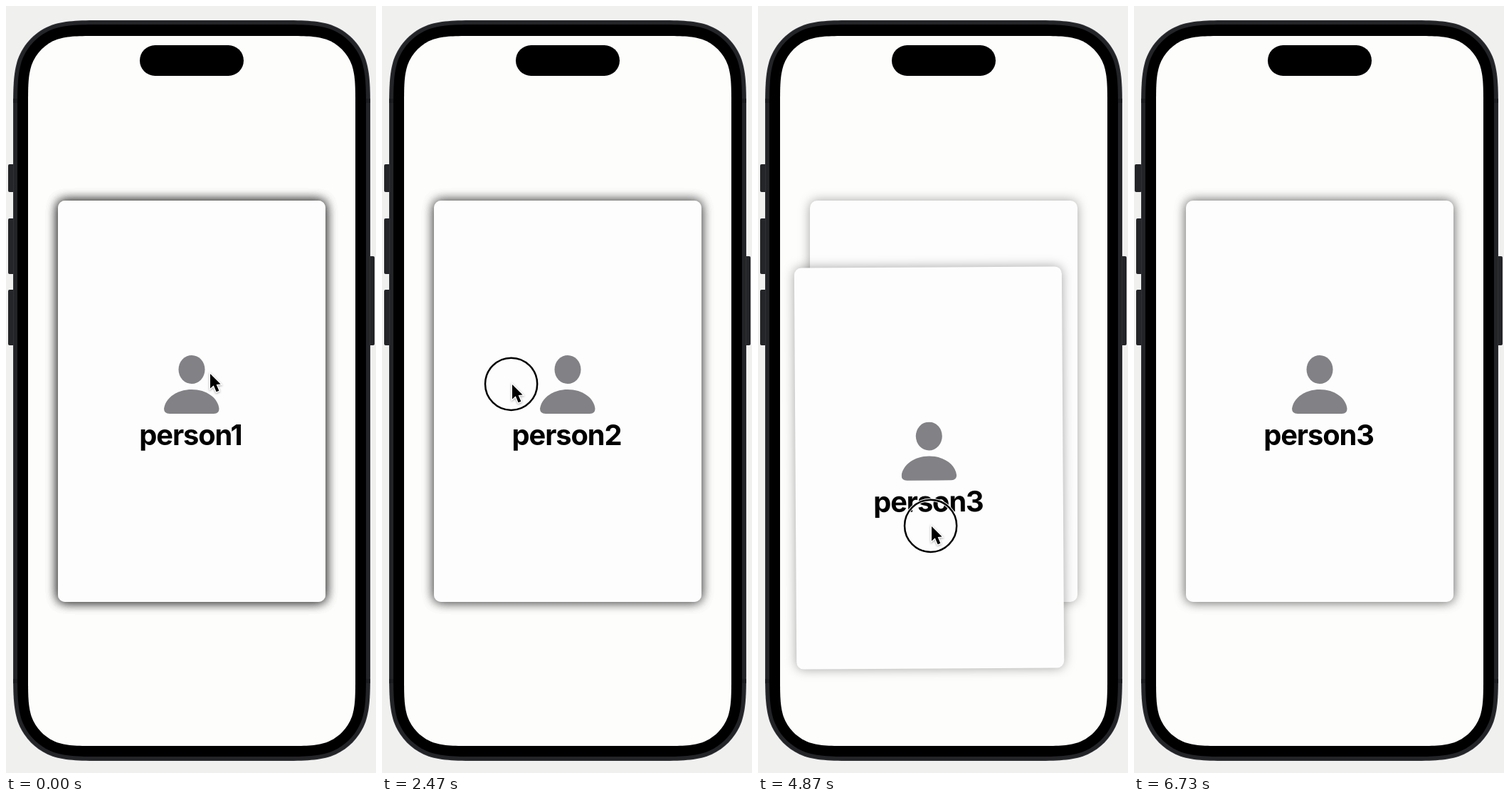
Recreate the animation shown at these times as an HTML page. Size 520 by 1076 pixels, loop 6.76 s.

```html
<!DOCTYPE html>
<html lang="en">
<head>
<meta charset="utf-8">
<title>Swipe cards</title>
<style>
  html, body { margin: 0; width: 100%; height: 100%; overflow: hidden; background: #f0f0ef; }
  #stage { position: relative; width: 520px; height: 1076px; overflow: hidden; }
  #stage div, #stage svg { position: absolute; box-sizing: border-box; }
  .side { width: 10px; background: #232528; border-radius: 2px; }
  .shell { left: 10px; top: 20px; width: 502px; height: 1039px; background: #303136; }
  .rim { left: 11px; top: 21px; width: 500px; height: 1037px; background: #232427; }
  .bezel { left: 16px; top: 26px; width: 490px; height: 1027px; background: #000; }
  .band { width: 6px; height: 6px; background: #1c1d20; }
  .screen { left: 31px; top: 42px; width: 460px; height: 996px; background: #fdfdfc; overflow: hidden; }
  .island { left: 188px; top: 55px; width: 146px; height: 43px; border-radius: 22px; background: #000; }
  .card { left: 42px; top: 231px; width: 376px; height: 563px; border-radius: 10px;
          box-shadow: 0 0 16px rgba(0, 0, 0, .36); }
  .card svg { left: 149px; top: 217px; }
  .name { left: -1.5px; top: 305.2px; width: 376px; height: 48px; text-align: center;
          font: 700 39.8px/48px Inter, "Liberation Sans", sans-serif; font-optical-sizing: none;
          letter-spacing: -1.1px; color: #000; white-space: nowrap; }
  #pointer { left: 0; top: 0; overflow: visible; }
  #arrow { filter: drop-shadow(0 1.5px 1.5px rgba(0, 0, 0, .35)); }
</style>
</head>
<body>
<div id="stage">
  <div class="side" id="action" style="left:3px;top:222px;height:39px"></div>
  <div class="side" style="left:3px;top:298px;height:78px"></div>
  <div class="side" style="left:3px;top:398px;height:78px"></div>
  <div class="side" style="left:508px;top:351px;height:125px"></div>
  <div class="shell" data-r="87"></div>
  <div class="rim" data-r="86"></div>
  <div class="band" style="left:10px;top:130px"></div>
  <div class="band" style="left:506px;top:130px"></div>
  <div class="band" style="left:10px;top:944px"></div>
  <div class="band" style="left:506px;top:944px"></div>
  <div class="bezel" data-r="81"></div>
  <div class="screen" id="screen" data-r="65"></div>
  <div class="island"></div>
  <svg id="pointer" width="1" height="1">
    <g id="ring" fill="none" transform="translate(-.4 1.3)">
      <circle r="36.6" stroke="#fff" stroke-width="4.4"/>
      <circle r="36.6" stroke="#000" stroke-width="2.5"/>
    </g>
    <path id="arrow" d="M1 2V22.5L5.8 18.2 9.6 27.3 13.4 25.7 9.6 16.9 15.6 16.6Z"
          fill="#000" stroke="#fff" stroke-width="2.6" paint-order="stroke"/>
  </svg>
</div>
<script>
  const LOOP = 6760, EXIT = 585, EXIT_MS = 380, BACK_MS = 450;
  const $ = id => document.getElementById(id);

  // pointer path: time, x, y
  const path = [
    [0, 286, 514], [120, 286, 514], [620, 353, 541], [780, 353, 541],
    [1470, 78, 693], [1600, 66, 697], [1750, 66, 697],
    [2350, 182, 529], [2480, 182, 529], [3100, 341, 593], [3340, 398, 606],
    [3770, 399, 607], [4260, 264, 503], [4380, 264, 503],
    [4870, 243, 728], [5330, 292.5, 305], [5680, 266, 450],
    [5900, 264, 450], [6520, -40, 242], [LOOP, -40, 242]
  ];

  // press and release of each drag, and the side the card leaves by
  const drags = [
    { press: 720, release: 1600, side: -1 },
    { press: 2420, release: 3340, side: 1 },
    { press: 4320, release: 5700, side: 0 }
  ];

  const clamp = v => Math.min(1, Math.max(0, v));
  const lerp = (a, b, k) => a + (b - a) * k;
  const smooth = k => k * k * (3 - 2 * k);

  // rounded rectangle whose corners ease into the straight sides
  function squircle(w, h, r) {
    const [a, b, c, d, e, f, g] = [1.5287, 1.0885, .8684, .6315, .0749, .3728, .1691].map(k => k * r);
    const corner = [[a, 0], [b, 0], [c, 0], [d, e], [f, g], [g, f], [e, d], [0, c], [0, b], [0, a]];
    const place = (flipX, flipY) => corner.map(([x, y]) => [flipX ? w - x : x, flipY ? h - y : y]);
    const sides = [place(0, 0), place(0, 1).reverse(), place(1, 1), place(1, 0).reverse()];
    return sides.map((p, i) => `${i ? "L" : "M"}${p[0]} C${p.slice(1).join(" ")}`).join(" ") + "Z";
  }

  for (const el of document.querySelectorAll("[data-r]"))
    el.style.clipPath = `path("${squircle(el.offsetWidth, el.offsetHeight, +el.dataset.r)}")`;

  function pointerAt(t) {
    let i = 1;
    while (i < path.length - 1 && path[i][0] <= t) i++;
    const a = path[i - 1], b = path[i];
    const k = smooth(clamp((t - a[0]) / (b[0] - a[0])));
    return [lerp(a[1], b[1], k), lerp(a[2], b[2], k)];
  }

  function offsetAt(d, t) {
    if (!d || t < d.press) return [0, 0];
    const from = pointerAt(d.press), now = pointerAt(Math.min(t, d.release));
    const x = now[0] - from[0], y = (now[1] - from[1]) * .415;
    if (t <= d.release) return [x, y];
    const k = smooth(clamp((t - d.release) / (d.side ? EXIT_MS : BACK_MS)));
    return [lerp(x, d.side * EXIT, k), lerp(y, 0, k)];
  }

  function tint(x) {
    const k = clamp((Math.abs(x) - 115) / 35);
    const to = x < 0 ? [255, 49, 40] : [46, 190, 79];
    return `rgb(${to.map(c => Math.round(lerp(253, c, k)))})`;
  }

  const cards = [1, 2, 3, 4].map(n => {
    const el = document.createElement("div");
    el.className = "card";
    el.innerHTML = `<svg width="78" height="83" fill="#828286">
      <ellipse cx="39" cy="20" rx="18.5" ry="20"/>
      <path d="M8 82Q0 82 0 75C2 60 18 48 39 48S76 60 77.5 75Q77.5 82 70 82Z"/></svg>
      <div class="name">person${n}</div>`;
    $("screen").prepend(el);
    return el;
  });

  function draw(t) {
    cards.forEach((el, i) => {
      const d = drags[i], [x, y] = offsetAt(d, t);
      const gone = d && d.side && t >= d.release + EXIT_MS;
      el.style.visibility = gone ? "hidden" : "visible";
      el.style.transform = x || y ? `rotate(${x / 60}deg) translate(${x}px, ${y}px)` : "none";
      el.style.background = tint(x);
    });
    const [px, py] = pointerAt(t);
    $("pointer").style.transform = `translate(${px}px, ${py}px)`;
    const held = drags.some(d => t >= d.press && t < d.release);
    $("ring").style.display = held ? "" : "none";
    $("action").style.left = t > 6400 ? "1px" : "3px";
  }

  function tick() {
    draw(performance.now() % LOOP);
    requestAnimationFrame(tick);
  }
  tick();
</script>
</body>
</html>
```
